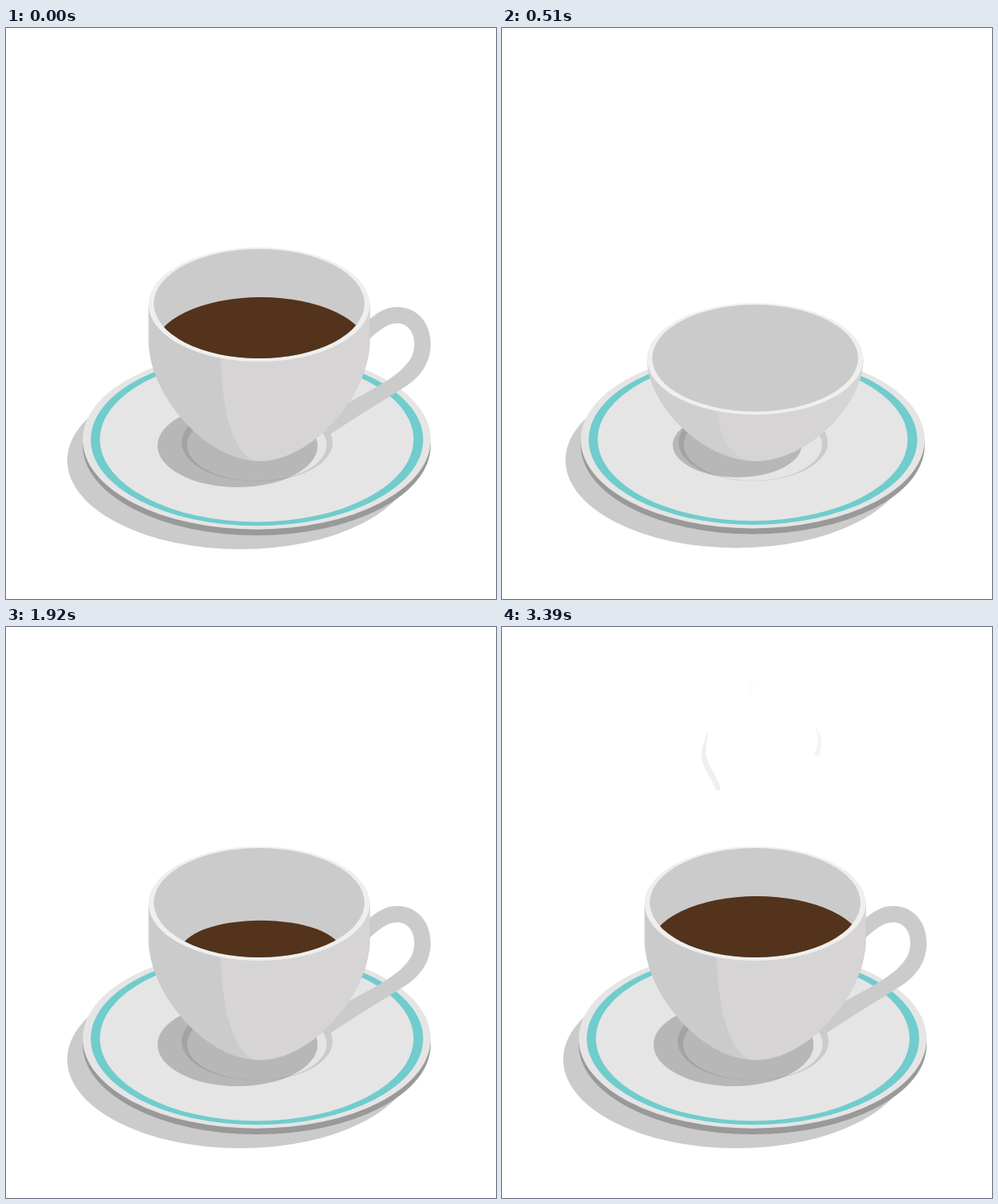
Write an HTML page with a canvas that moves like this. It is 600x700 px and loops after 4.28 s.

```html
<!DOCTYPE html>
<html lang="en">
<head>
<meta charset="utf-8">
<title>Cup of coffee</title>
<style>
html, body { margin: 0; width: 100%; height: 100%; overflow: hidden; background: #fff; }
canvas { display: block; }
</style>
</head>
<body>
<canvas id="stage" width="600" height="700"></canvas>
<script>
const ctx = document.getElementById('stage').getContext('2d');
const LOOP = 4280, STEP = 30, CUP_HEIGHT = 192, CUP_BASE = 531;
const GREY = '#cbcbcb', TEAL = '#70cccd';

const clamp = v => Math.max(0, Math.min(1, v));
const ramp = (t, a, b) => clamp((t - a) / (b - a));
const smooth = u => (1 - Math.cos(Math.PI * u)) / 2;
const linear = u => u;

// Interpolates [position, value] pairs sorted by position.
function track(keys, p, ease = smooth) {
  if (p <= keys[0][0]) return keys[0][1];
  for (let i = 1; i < keys.length; i++) {
    const [a, va] = keys[i - 1], [b, vb] = keys[i];
    if (p <= b) return va + (vb - va) * ease((p - a) / (b - a));
  }
  return keys[keys.length - 1][1];
}

const saucerScale = [[30, 0], [130, 1.1], [260, .985], [500, .988], [650, 1.03], [830, 1]];
const cupHeight = [[390, 0], [600, 205], [840, 189.5], [1000, 192]];
const cupWidth = [[390, 0], [490, .975], [600, 1]];
const coffeeTop = [[1260, 405], [2340, 331], [2500, 330]];
const coffeeRx = [[1260, 45], [1500, 70], [1770, 94], [2340, 108], [2500, 130]];
const coffeeRy = [[1260, 20], [1500, 25], [1770, 30], [2340, 56], [2500, 62]];

// Each wisp: bends as [y, x]; head and tail as [time, y].
const wisps = [
  { bends: [[64, 308], [78, 304], [150, 320], [228, 303], [275, 323], [298, 313]],
    head: [[2340, 233], [2850, 64]], tail: [[2800, 298], [3390, 81]] },
  { bends: [[118, 384], [140, 389], [190, 374], [240, 380], [306, 371], [328, 380]],
    head: [[2340, 297], [2850, 118]], tail: [[2710, 328], [3390, 155]] },
  { bends: [[125, 252], [155, 247], [205, 265], [250, 256], [300, 268], [332, 257]],
    head: [[2340, 332], [2880, 125]], tail: [[2615, 332], [3390, 198]] }
];

function ellipse(x, y, rx, ry, color) {
  ctx.beginPath();
  ctx.ellipse(x, y, Math.max(0, rx), Math.max(0, ry), 0, 0, 2 * Math.PI);
  if (color) {
    ctx.fillStyle = color;
    ctx.fill();
  }
}

function fillPath(d, color) {
  ctx.fillStyle = color;
  ctx.fill(new Path2D(d));
}

function drawSaucer(scale) {
  ctx.save();
  ctx.translate(308, 500);
  ctx.scale(scale, scale);
  ctx.translate(-308, -500);
  ellipse(287, 530, 212, 109, GREY);
  ellipse(307, 512, 213, 110, '#999');
  ellipse(307, 504.7, 213, 110, '#e5e5e5');
  ellipse(307.3, 504.7, 203.5, 105.5, TEAL);
  ellipse(307, 504.4, 192, 101, '#e5e5e5');
  ellipse(307.5, 508, 92.5, 48, GREY);
  ellipse(307.2, 511, 85.5, 44.5, '#e5e5e5');
  ctx.restore();
}

function drawHandle(grow, drop) {
  if (!grow) return;
  ctx.save();
  ctx.translate(440, 430 + drop);
  ctx.scale(grow, grow);
  ctx.translate(-440, -430);
  fillPath('M440 362C455 347 467 342 479 342C504 342 520 362 520 388' +
    'C520 412 505 430 487 441C455 461 430 476 397 498L390 480L420 459' +
    'C440 447 470 433 485 418C496 407 500 399 500 387C500 372 491 362 479 362' +
    'C466 362 455 372 440 386Z', GREY);
  ctx.restore();
}

function drawBody(rim, h, w) {
  const r = 135.5 * w, left = 310 - r, right = 310 + r;
  const curve = Math.min(h, 148), y = CUP_BASE - curve;
  const bend = y + .45 * curve, flat = 65 * w;
  const splitX = 310 - 47 * w, splitY = rim + 60 * w;
  const rightSide = `C${310 + flat} ${CUP_BASE} ${right} ${bend} ${right} ${y}V${rim}`;
  fillPath(`M${left} ${rim}V${y}C${left} ${bend} ${310 - flat} ${CUP_BASE} 310 ${CUP_BASE}` +
    `${rightSide}Z`, h < 160 ? '#d0cfd0' : GREY);
  fillPath(`M${splitX} ${rim}V${splitY}C${splitX} ${splitY + .53 * (CUP_BASE - splitY)} ` +
    `${310 - 30 * w} ${CUP_BASE} 310 ${CUP_BASE}${rightSide}Z`, '#d6d4d5');
}

function drawCup(t) {
  const h = track(cupHeight, t), w = track(cupWidth, t);
  if (h <= 0) return;
  const rim = CUP_BASE - h, tall = (h - 126) / 66;
  ellipse(288 - 4.5 * tall, 511 + tall, (81 + 17 * tall) * w, (41 + 10 * tall) * w, 'rgba(0,0,0,.2)');
  drawHandle(smooth(ramp(t, 560, 730)), CUP_HEIGHT - h);
  drawBody(rim, h, w);
  ellipse(310, rim, 135.5 * w, 70 * w, '#efefee');

  ctx.save();
  ellipse(310, rim - 1, 129 * w, 67 * w, GREY);
  ctx.clip();
  ctx.globalAlpha = ramp(t, 570, 780);
  ellipse(310, 423, 75, 38, '#bdbdbd');
  ctx.globalAlpha = 1;
  if (t >= 1260) {
    const ry = track(coffeeRy, t, linear);
    ellipse(312, track(coffeeTop, t, linear) + ry, track(coffeeRx, t, linear), ry, '#53331b');
  }
  ctx.restore();
}

function drawWisp({ bends, head, tail }, t) {
  const top = bends[0][0], bottom = bends[bends.length - 1][0];
  const from = track(head, t, linear), to = track(tail, t, linear);
  ctx.beginPath();
  for (let y = from; y < to; y += .5) {
    const r = 3.3 * Math.min(1, Math.min(y - top, bottom - y) / 38) ** .8;
    const x = track(bends, y);
    if (r > 0) {
      ctx.moveTo(x + r, y);
      ctx.arc(x, y, r, 0, 2 * Math.PI);
    }
  }
  ctx.fillStyle = `rgba(230,230,230,${.65 * clamp((to - from) / 55)})`;
  ctx.fill();
}

function draw(time) {
  const t = Math.floor(time % LOOP / STEP) * STEP;
  const pose = t < 30 ? LOOP : t;
  ctx.clearRect(0, 0, 600, 700);
  drawSaucer(track(saucerScale, pose));
  drawCup(pose);
  if (t >= 2340) wisps.forEach(wisp => drawWisp(wisp, t));
}

const start = performance.now();
function tick() {
  draw(performance.now() - start);
  requestAnimationFrame(tick);
}
tick();
</script>
</body>
</html>
```
